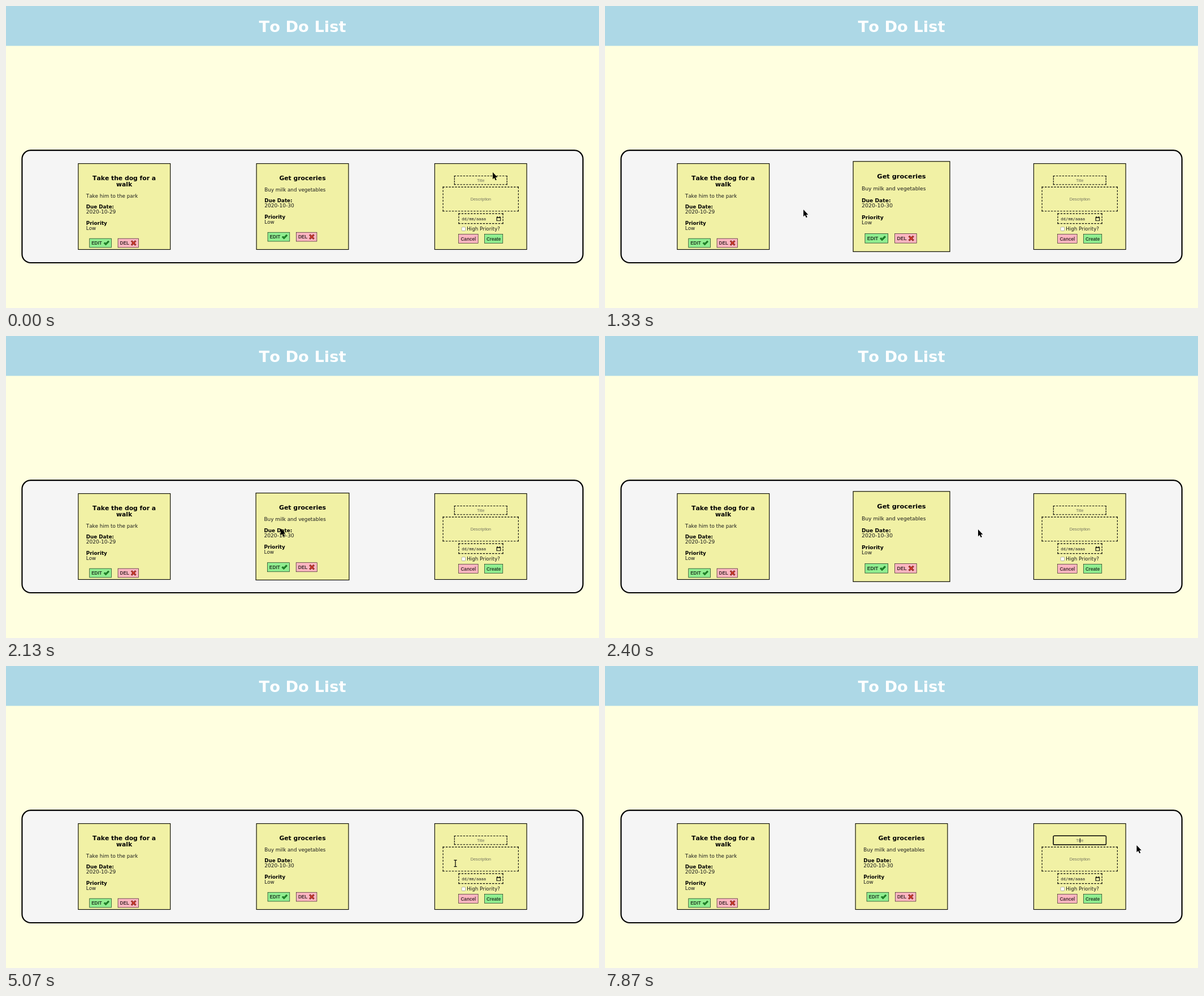
Write an HTML page that moves like this. It is 1049 px wide and 534 px high and loops after 8000 ms.

```html
<!DOCTYPE html>
<html lang="en">
<head>
<meta charset="utf-8">
<title>To Do List</title>
<style>
  * { box-sizing: border-box; margin: 0; }
  html, body { width: 100%; height: 100%; overflow: hidden; background: #ffffe0; }
  #page {
    width: 1920px; height: 978px; transform: scale(calc(1049 / 1920)); transform-origin: 0 0;
    font: 16px/1 "DejaVu Sans", sans-serif; font-kerning: none; color: #1a1a1a;
  }
  h1 { height: 129px; font-size: 50px; line-height: 134px; text-align: center; color: #fff; background: #add8e6; }
  main {
    position: absolute; left: 50px; right: 50px; top: 465px; padding: 40px;
    display: flex; justify-content: space-around;
    background: #f5f5f5; border: 4px solid #000; border-radius: 30px;
  }
  .card { width: 300px; height: 280px; padding: 36px 25px 0; background: #f1f1a5; border: 2px solid #000; }
  h2 { font-size: 19.8px; line-height: 20px; text-align: center; color: #000; }
  p { margin-top: 20px; }
  b { display: block; color: #000; }
  .date { font-size: 16.5px; line-height: 16px; }
  .buttons { display: flex; margin: 25px 10px 0; gap: 20px; }
  .button {
    height: 30px; padding: 0 6px; border: 1px solid #000; background: #90ee90;
    display: flex; align-items: center; gap: 4px;
    font: bold 15px "Liberation Sans", Arial, sans-serif; color: rgba(0, 0, 0, .74);
  }
  .stop { background: #ffb6c1; }
  .form { display: flex; flex-direction: column; align-items: center; gap: 6px; padding-top: 38px; }
  .form .buttons { margin: 0; }
  .field {
    position: relative; display: flex; align-items: center; justify-content: center; flex: none;
    border: 2px dashed #000; font: 13.33px "Liberation Sans", Arial, sans-serif; color: #757560;
  }
  #title { width: 172px; height: 30px; }
  #title.focus { border-style: solid; border-radius: 4px; box-shadow: 0 0 0 1px #000; }
  #note { width: 100%; height: 80px; }
  #due { width: 145px; height: 34px; padding: 0 5px 0 9px; justify-content: space-between;
    font: 13px "DejaVu Sans Mono", monospace; color: #222; }
  #caret { position: absolute; left: 50%; width: 2px; height: 15px; background: #222; }
  .check { display: flex; align-items: center; gap: 4px; height: 21px; flex: none; }
  .check i { width: 13px; height: 13px; border: 1px solid #767676; border-radius: 3px; background: #fff; }
  .pointer { position: absolute; left: 0; top: 0; overflow: visible; }
</style>
</head>
<body>
<div id="page">
  <h1>To Do List</h1>
  <main>
    <div class="card form">
      <div class="field" id="title">Title<span id="caret"></span></div>
      <div class="field" id="note">Description</div>
      <div class="field" id="due">dd/mm/aaaa
        <svg width="16" height="16" fill="none" stroke="#000" stroke-width="2"><path d="M2 4H14V15H2ZM2 5H14M4 1V4M12 1V4"/></svg>
      </div>
      <div class="check"><i></i>High Priority?</div>
      <div class="buttons"><span class="button stop">Cancel</span><span class="button">Create</span></div>
    </div>
  </main>
</div>
<svg class="pointer" id="arrow" width="9" height="15">
  <path d="M0 0V12.3L2.8 9.8 4.9 14.2 6.8 13.3 4.8 9H8.4Z"/>
</svg>
<svg class="pointer" id="beam" width="6" height="12" fill="none" stroke="#000" stroke-width="1.2">
  <path d="M-2.5-5.6H2.5M0-5.6V5.6M-2.5 5.6H2.5"/>
</svg>
<script>
const LOOP = 8000, STEP = 200 / 3, FOCUS_STEP = 102, BLINK_STEPS = 8;
const $ = id => document.getElementById(id);

const icon = (path, attrs) => `<svg width="20" height="20"><path d="${path}" ${attrs}/></svg>`;
const tick = icon('M2 11L5 8 8 11 16 3 19 6 8 17Z', 'fill="#1c9a2a" stroke="#123d12" stroke-width="1.6"');
const cross = icon('M2 5L5 2 10 7 15 2 18 5 13 10 18 15 15 18 10 13 5 18 2 15 7 10Z',
  'fill="#dc3a2c" stroke="#4a1512" stroke-width="1.6"');

const card = (title, note, due) => `<div class="card task">
  <h2>${title}</h2><p>${note}</p>
  <p><b>Due Date:</b><span class="date">${due}</span></p>
  <p><b>Priority</b>Low</p>
  <div class="buttons"><span class="button">EDIT${tick}</span><span class="button stop">DEL${cross}</span></div>
</div>`;

document.querySelector('main').insertAdjacentHTML('afterbegin',
  card('Take the dog for a walk', 'Take him to the park', '2020-10-29') +
  card('Get groceries', 'Buy milk and vegetables', '2020-10-30'));

const bounds = el => el.getBoundingClientRect();
const tasks = [...document.querySelectorAll('.task')].map(el => ({ el, box: bounds(el) }));
const textFields = [$('title'), $('note')].map(bounds);
const inside = (box, [x, y]) => x > box.left && x < box.right && y > box.top && y < box.bottom;

// Pointer moves: [start step, end step, x, y]; it rests in between.
const moves = [
  [0, 0, 861, 294], [0, 13, 812, 350], [13, 20, 351, 360], [20, 24, 226, 346], [24, 27, 268, 338],
  [27, 36, 660, 342], [36, 39, 724, 341], [39, 49, 806, 341], [52, 56, 802, 347],
  [64, 67, 796, 352], [70, 76, 795, 349], [93, 97, 809, 311], [101, 110, 940.5, 317]
];

function pointerAt(step) {
  let [, , x, y] = moves[0];
  for (const [start, end, toX, toY] of moves.slice(1)) {
    const p = Math.min(1, Math.max(0, (step - start) / (end - start)));
    x += (toX - x) * p;
    y += (toY - y) * p;
  }
  return [x, y];
}

// A card grows with the time the pointer has recently spent on it.
function hoverAt(box, step) {
  let hits = 0;
  for (let back = .5; back <= 4; back += .5) hits += inside(box, pointerAt(step - back));
  return Math.min(1, hits / 4);
}

function draw(now) {
  const step = Math.floor((now % LOOP + 3.4) / STEP);
  for (const { el, box } of tasks) el.style.transform = `scale(${1 + .05 * hoverAt(box, step)})`;

  const point = pointerAt(step);
  const typing = textFields.some(box => inside(box, point));
  for (const id of ['arrow', 'beam']) {
    $(id).style.transform = `translate(${point[0]}px, ${point[1]}px)`;
    $(id).style.display = (id === 'beam') === typing ? '' : 'none';
  }

  const sinceFocus = step - FOCUS_STEP;
  $('title').classList.toggle('focus', sinceFocus >= 0);
  $('caret').hidden = sinceFocus < 0 || Math.floor(sinceFocus / BLINK_STEPS) % 2 === 1;
  requestAnimationFrame(draw);
}
requestAnimationFrame(draw);
</script>
</body>
</html>
```
